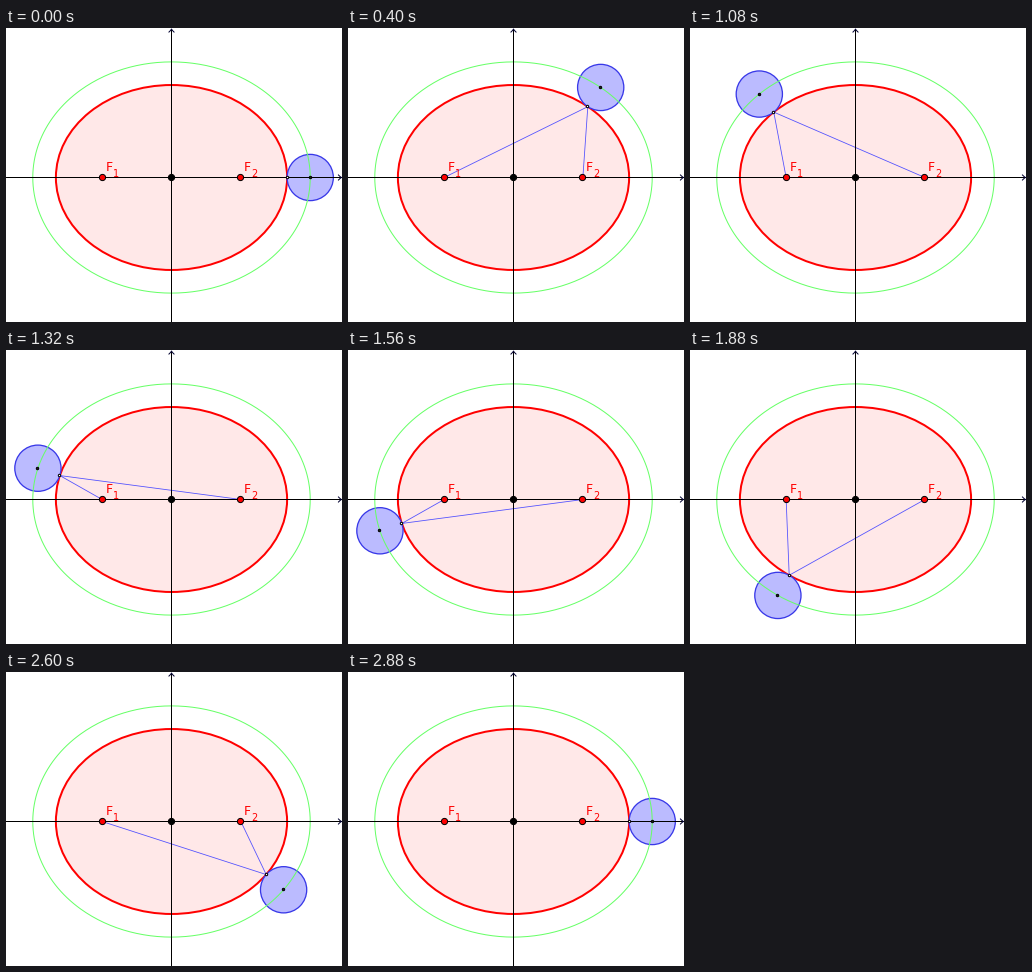
A matplotlib script that plays this animation: 336 px wide and 294 px high, repeating every 2.92 s.

```python
import numpy as np
import matplotlib.pyplot as plt
from matplotlib.animation import FuncAnimation
from matplotlib.patches import Circle, Ellipse

W, H, DPI = 336, 294, 96
PT = 72 / DPI                 # points per pixel
UNIT = 23.12                  # pixels per unit length
CX, CY = 165.5, 149.5
A, B, C, R = 5, 4, 3, 1       # semi-axes, focal distance, disc radius
FRAMES, STEP = 73, 5

BLUE = "#3838e8"
RED = "#ff0000"

fig = plt.figure(figsize=(W / DPI, H / DPI), dpi=DPI, facecolor="white")
ax = fig.add_axes([0, 0, 1, 1])
ax.set_xlim(0, W)
ax.set_ylim(H, 0)
ax.axis("off")


def to_px(x, y):
    return CX + UNIT * x, CY - UNIT * y


def pixel_centre(p):
    return tuple(np.floor(p) + 0.5)


def on_ellipse(t):
    return A * np.cos(t), B * np.sin(t)


def on_parallel(t):
    """Point at distance R from the ellipse along its outer normal."""
    x, y = on_ellipse(t)
    nx, ny = B * np.cos(t), A * np.sin(t)
    n = np.hypot(nx, ny)
    return x + R * nx / n, y + R * ny / n


def stroke(xs, ys, color, width, z):
    return ax.plot(xs, ys, color=color, lw=width * PT, zorder=z,
                   solid_capstyle="butt", snap=False)[0]


def dot(p, r, face, z):
    return ax.add_patch(Circle(pixel_centre(p), r, fc=face, ec="black",
                               lw=PT, zorder=z, snap=False))


def arrow_tip(x, y, dx, dy):
    """Curved barbs of an open arrow head pointing along (dx, dy)."""
    s = np.linspace(-1, 1, 21)
    back, side = 3.4 * np.abs(s) ** 0.8, 2.9 * s
    stroke(x - dx * back - dy * side, y - dy * back + dx * side,
           "#000030", 1, 5)


def label(x, text):
    style = dict(color=RED, family="DejaVu Sans", zorder=8,
                 ha="left", va="baseline")
    ax.text(x, 143, "F", fontsize=12.4 * PT, **style)
    ax.text(x + 7.5, 149, text, fontsize=9.8 * PT, **style)


# Ellipse and its parallel curve
ax.add_patch(Ellipse((CX, CY), 2 * A * UNIT, 2 * B * UNIT,
                     fc="#ffe8e8", ec=RED, lw=2 * PT, zorder=1))
turn = np.linspace(0, 2 * np.pi, 361)
stroke(*to_px(*on_parallel(turn)), "#66ff66", 1, 3)

# Axes
stroke([0, W - 0.5], [CY, CY], "black", 1, 5)
stroke([CX, CX], [1, H], "black", 1, 5)
arrow_tip(W - 0.5, CY, 1, 0)
arrow_tip(CX, 1, 0, -1)

# Centre and foci
dot((CX, CY), 3.1, "black", 6)
foci = [to_px(-C, 0), to_px(C, 0)]
for focus, name in zip(foci, "12"):
    dot(focus, 3.1, RED, 6)
    label(pixel_centre(focus)[0] + 3, name)

# Moving parts
disc = ax.add_patch(Circle((0, 0), R * UNIT, fc="#bbbbff", ec=BLUE,
                           lw=1.3 * PT, zorder=2))
rays = stroke([], [], "#5050ff", 0.8, 4)
touch = dot((0, 0), 1.2, "white", 7)
hub = dot((0, 0), 1.2, "#202020", 7)


def update(k):
    t = np.radians(STEP * k)
    p = to_px(*on_ellipse(t))
    q = to_px(*on_parallel(t))
    disc.center = q
    touch.center = pixel_centre(p)
    hub.center = pixel_centre(q)
    rays.set_data(*zip(foci[0], p, foci[1]))
    return disc, rays, touch, hub


anim = FuncAnimation(fig, update, frames=FRAMES, interval=40,
                     repeat=True, repeat_delay=0, blit=False)
plt.show()
```
